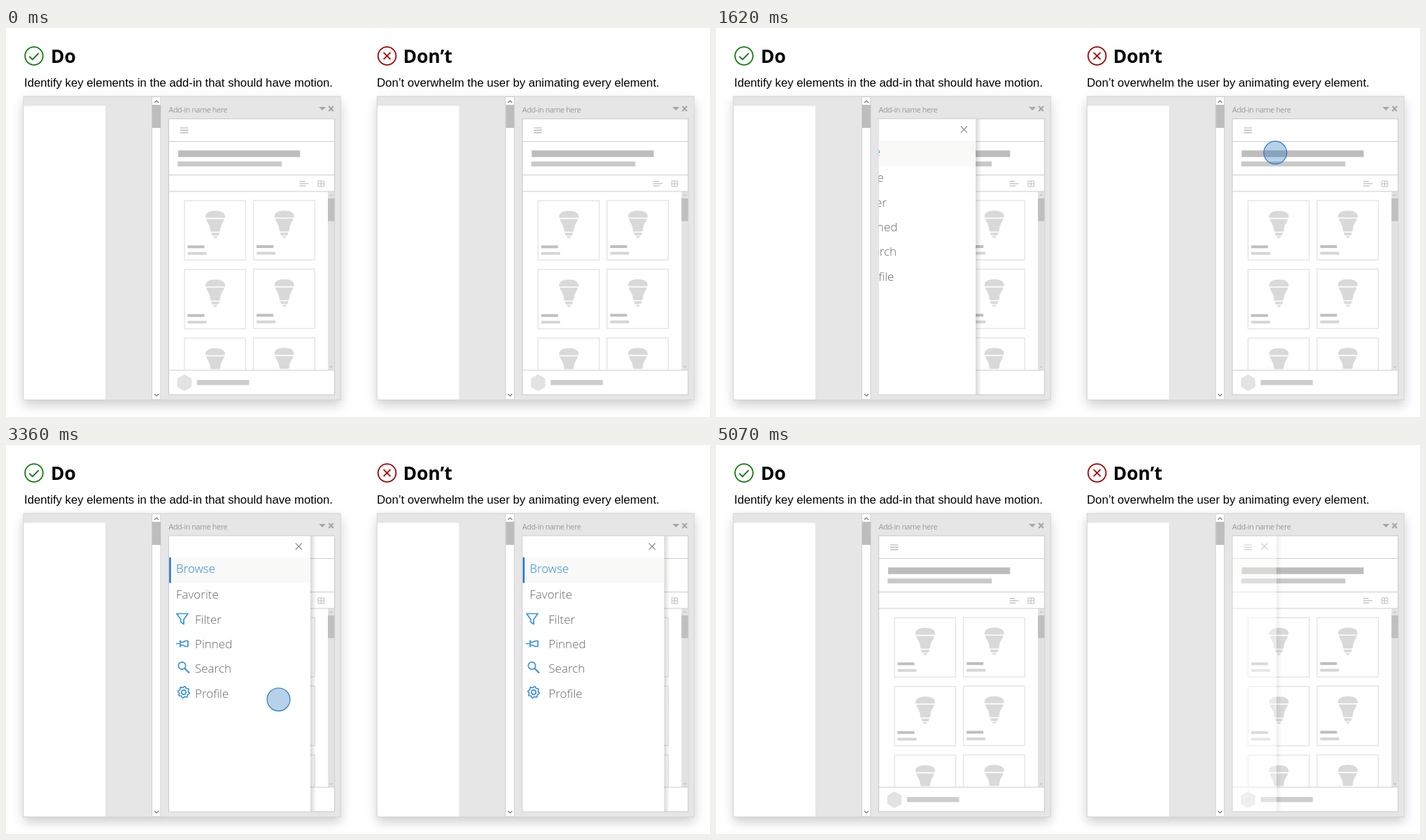
Write an HTML page that moves like this. It is 1006 px wide and 557 px high and loops after 5100 ms.

```html
<!DOCTYPE html>
<html lang="en">
<head>
<meta charset="utf-8">
<title>Do and Don’t: motion in add-ins</title>
<style>
html, body { margin: 0; width: 100%; height: 100%; overflow: hidden; background: #fff; }
svg { display: block; width: 100%; height: 100%; }
.head { font: 700 26.4px "Open Sans", "Noto Sans", sans-serif; }
.sub { font: 16.74px "Liberation Sans", Arial, sans-serif; }
.name { font: 10.7px "Open Sans", "Noto Sans", sans-serif; letter-spacing: -.35px; fill: #999; }
.item { font: 300 17px "Open Sans", "Noto Sans", sans-serif; fill: #666; }
.item.on { fill: #2588dc; }
.blue { fill: none; stroke: #3a92de; stroke-width: 1.7; stroke-linejoin: round; }
</style>
</head>
<body>
<svg id="stage" viewBox="0 0 1006 557">
  <defs>
    <filter id="soft" x="-10%" y="-10%" width="120%" height="125%">
      <feDropShadow dx="0" dy="7" stdDeviation="8" flood-color="#000" flood-opacity=".2"/>
    </filter>
    <linearGradient id="edge">
      <stop offset="0" stop-color="#000" stop-opacity=".16"/>
      <stop offset="1" stop-color="#000" stop-opacity="0"/>
    </linearGradient>
    <clipPath id="pane"><rect x="232.5" y="130" width="237" height="395"/></clipPath>
    <clipPath id="list"><rect x="233" y="234" width="227" height="255.5"/></clipPath>
    <g id="bulb" fill="#d9d9d9">
      <path d="M-14 8.5C-14 3-9 0 0 0S14 3 14 8.5L13.6 10H-13.6Z"/>
      <path d="M-13 11.6H13C12 16 8.5 19 7.6 24L7 28.5Q6.7 30 5 30H-5Q-6.7 30 -7 28.5L-7.6 24C-8.5 19-12 16-13 11.6Z"/>
      <path d="M-6 31.5H6L4.5 35.5H-4.5ZM-3 36.8H3L1.8 39H-1.8Z"/>
    </g>
  </defs>
</svg>
<script>
const LOOP = 5100, SHIFT = 505.3, MENU_W = 202;
const stage = document.getElementById('stage');
const clamp = v => Math.max(0, Math.min(1, v));
const rect = (x, y, w, h, fill, more = '') =>
  `<rect x="${x}" y="${y}" width="${w}" height="${h}" fill="${fill}" ${more}/>`;
const line = (d, color, w = 1) =>
  `<path d="${d}" fill="none" stroke="${color}" stroke-width="${w}"/>`;

const card = (x, y) =>
  rect(x, y, 87.5, 85, '#fff', 'stroke="#e4e4e4" stroke-width="1.4"') +
  `<use href="#bulb" x="${x + 44}" y="${y + 14.5}"/>` +
  rect(x + 4.5, y + 64, 24, 4, '#bfbfbf') +
  rect(x + 4.5, y + 73.5, 27, 4, '#d6d6d6');

function cards() {
  let out = '';
  for (let r = 0; r < 3; r++) out += card(255, 247.3 + r * 98.4) + card(353.6, 247 + r * 98.3);
  return out;
}

const win = () =>
  rect(25, 98, 453, 434.5, '#e6e6e6', 'filter="url(#soft)"') +
  rect(25, 98, 453, 434.5, 'none', 'stroke="#d4d4d4"') +
  rect(25.5, 111.5, 116.5, 420.5, '#fff') +
  rect(208.5, 98.5, 12.5, 433.5, '#fff', 'stroke="#cfcfcf"') +
  rect(209, 110, 12, 33, '#bdbdbd') +
  line('M212 107l3-3 3 3M212 524l3 3 3-3', '#777', 1.2) +
  '<text class="name" x="232.5" y="121.3">Add-in name here</text>' +
  '<path d="M447 113h10l-5 5z" fill="#a6a6a6"/>' +
  line('M461.2 112l6.6 7M467.8 112l-6.6 7', '#a6a6a6', 2.2) +
  rect(232.5, 130, 237, 395, '#fff', 'stroke="#cdcdcd" stroke-width="1.2"') +
  line('M249 143h11.5M249 146.4h11.5M249 149.8h11.5', '#b0b0b0', 1.2) +
  rect(246, 175.3, 174.3, 9.5, '#bdbdbd') +
  rect(245.3, 191.2, 148.7, 7, '#c9c9c9') +
  line('M419.5 219.7h8M419.5 222.9h13M419.5 226.1h9', '#bdbdbd', 1.2) +
  line('M446 219h8.5v8h-8.5zM450.2 219v8M446 223h8.5', '#bdbdbd') +
  rect(460, 234, 9.5, 256, '#e2e2e2') + rect(460, 244, 9.5, 32.5, '#bfbfbf') +
  line('M462.5 240.5l2.2-2.2 2.2 2.2M462.5 484l2.2 2.2 2.2-2.2', '#b0b0b0') +
  `<g clip-path="url(#list)">${cards()}</g>` +
  line('M232.5 162.5h237M232.5 210.5h237M232.5 234h237M232.5 490h237', '#cdcdcd', 1.2) +
  '<path d="M255 496l10.3 6v12l-10.3 6-10.3-6v-12z" fill="#e3e3e3"/>' +
  rect(273, 504, 74.5, 7.3, '#cdcdcd');

function gear() {
  let d = '';
  for (let i = 0; i < 64; i++) {
    const a = i / 64 * Math.PI * 2, r = 7.4 + .9 * Math.sin(a * 8);
    d += (i ? 'L' : 'M') + (r * Math.cos(a)).toFixed(2) + ' ' + (r * Math.sin(a)).toFixed(2);
  }
  return d + 'Z';
}

// label, text x, baseline, icon x, icon y, icon markup
const ITEMS = [
  ['Browse', 243, 183],
  ['Favorite', 243, 220],
  ['Filter', 270, 256, 252, 249, '<path d="M-8-7.5H8L2 .8V7.5L-2.2 4.5V.8Z"/>'],
  ['Pinned', 270, 291, 252, 284.5, '<path d="M-9 0H-3M-3-5V5M-3-2.2H1L4.5-4H8V4H4.5L1 2.2H-3"/>'],
  ['Search', 270, 326, 254, 318.5, '<circle cx="-2.5" cy="-2.5" r="5.2"/><path d="M1.3 1.3L8 8" stroke-width="2.1"/>'],
  ['Profile', 270, 362, 254, 354, `<path d="${gear()}"/><circle r="3.2"/>`]
];

const menu = () =>
  rect(435, 130.6, 8, 394, 'url(#edge)') +
  rect(233, 130.6, MENU_W, 394, '#fff') +
  rect(233, 161, MENU_W, 36.5, '#f9f9f7') +
  rect(233.3, 161, 2.4, 36.5, '#1b73c4') +
  ITEMS.map(([label, x, y, ix, , icon], i) =>
    (icon ? `<g class="blue icon">${icon}</g>` : '') +
    `<text class="item${i ? '' : ' on'}" x="${x}" y="${y}">${label}</text>`).join('') +
  `<g class="close">${line('M-4.6-4.6L4.6 4.6M4.6-4.6L-4.6 4.6', '#858585', 1.2)}</g>`;

function side(dx) {
  const g = document.createElementNS('http://www.w3.org/2000/svg', 'g');
  g.setAttribute('transform', `translate(${dx})`);
  g.innerHTML = win() +
    `<g clip-path="url(#pane)"><g class="menu">${menu()}</g></g>` +
    '<circle class="dot" r="16.4" fill="#0f6cbd" fill-opacity=".3" stroke="#2f78bd" stroke-width="1.2"/>';
  stage.append(g);
  return {
    menu: g.querySelector('.menu'), dot: g.querySelector('.dot'), close: g.querySelector('.close'),
    icons: [...g.querySelectorAll('.icon')], labels: [...g.querySelectorAll('.item')]
  };
}

const left = side(0), right = side(SHIFT);
const badge = (x, color, d) =>
  `<circle cx="${x}" cy="40" r="12.8" fill="none" stroke="${color}" stroke-width="1.8"/>` + line(d, color, 1.9);
stage.insertAdjacentHTML('beforeend',
  badge(40, '#107c10', 'M33.3 40.6l4.6 4.6 8.8-9') +
  badge(544.5, '#a80000', 'M539.6 35.1l9.8 9.8M549.4 35.1l-9.8 9.8') +
  '<text class="head" x="64" y="50">Do</text><text class="head" x="567.5" y="50">Don’t</text>' +
  '<text class="sub" x="26" y="83.7">Identify key elements in the add-in that should have motion.</text>' +
  '<text class="sub" x="530" y="83.7">Don’t overwhelm the user by animating every element.</text>');

// smooth curve through [time, value, ...] keys, held at both ends
function track(keys, t, c = 1) {
  const n = keys.length - 1;
  if (t <= keys[0][0]) return keys[0][c];
  if (t >= keys[n][0]) return keys[n][c];
  let i = 0;
  while (t > keys[i + 1][0]) i++;
  const slope = k => k > 0 && k < n ? (keys[k + 1][c] - keys[k - 1][c]) / (keys[k + 1][0] - keys[k - 1][0]) : 0;
  const a = keys[i], b = keys[i + 1], h = b[0] - a[0], s = (t - a[0]) / h, q = 1 - s;
  return a[c] * (1 + 2 * s) * q * q + b[c] * s * s * (3 - 2 * s) +
    h * s * q * (slope(i) * q - slope(i + 1) * s);
}

const OPEN_PATH = [[0, 440, 575], [200, 457, 500], [390, 462, 406], [540, 402, 300], [660, 312, 196], [800, 253.5, 146]];
const CLOSE_PATH = [[0, 238, 575], [220, 168, 523], [390, 114, 473], [460, 108, 453], [540, 168, 421],
  [660, 388, 365], [720, 440, 310], [800, 434, 205], [900, 419, 146]];
const SWAY = [[-90, -130], [0, -5], [30, 20], [60, 27], [90, 24], [120, 8], [150, -6], [190, -9],
  [300, 0], [450, 0], [550, 8], [600, 0]];
const GROW = [[-15, 0], [0, .2], [30, .75], [60, .92], [90, 1], [450, 1], [560, .85], [600, 1]];
const CROSS = [[1800, 233, -360], [2040, 374, -250], [2330, 375, -140], [2610, 375, -45], [2950, 418, 0]];

function moveDot(dot, t, enter, leave, path) {
  dot.setAttribute('opacity', t < enter ? 0 : clamp((leave + 60 - t) / 60));
  dot.setAttribute('cx', track(path, t - enter, 1));
  dot.setAttribute('cy', track(path, t - enter, 2));
}

function slide(t, open, close) {
  const opened = 1 - (1 - clamp((t - open) / 380)) ** 3;
  return (opened - clamp((t - close) / 290) ** 2 - 1) * MENU_W;
}

function setMenu(s, off, opacity) {
  s.menu.setAttribute('transform', `translate(${off})`);
  s.menu.setAttribute('opacity', off <= -MENU_W + .01 ? 0 : opacity);
}

function draw(t) {
  if (t < 2300) {
    moveDot(left.dot, t, 450, 1430, OPEN_PATH);
    moveDot(right.dot, t, 930, 1760, OPEN_PATH);
  } else {
    moveDot(left.dot, t, 2700, 3640, CLOSE_PATH);
    moveDot(right.dot, t, 3630, 4760, CLOSE_PATH);
  }
  setMenu(left, slide(t, 1500, 3700), 1);
  const off = slide(t, 1800, 4830);
  setMenu(right, off, clamp((t - 1800) / 280) * (1 - .7 * clamp((t - 4830) / 290)));

  const fix = t < 2300 ? off : 0;
  ITEMS.forEach((it, i) => {
    const u = t - 2040 + (5 - i) * 30;
    right.labels[i].setAttribute('transform', `translate(${track(SWAY, u) - fix})`);
    if (i < 2) return;
    const k = i < 4 ? 1 : track(GROW, u);
    right.icons[i - 2].setAttribute('transform', `translate(${it[3] - 5.3} ${it[4]}) scale(${k})`);
  });
  right.close.setAttribute('transform',
    `translate(${track(CROSS, t) - fix} 145.3) rotate(${track(CROSS, t, 2)})`);
}

left.icons.forEach((g, i) => g.setAttribute('transform', `translate(${ITEMS[i + 2][3]} ${ITEMS[i + 2][4]})`));
left.close.setAttribute('transform', 'translate(418.3 145.3)');

const start = performance.now();
function tick() {
  draw((performance.now() - start) % LOOP);
  requestAnimationFrame(tick);
}
tick();
</script>
</body>
</html>
```
